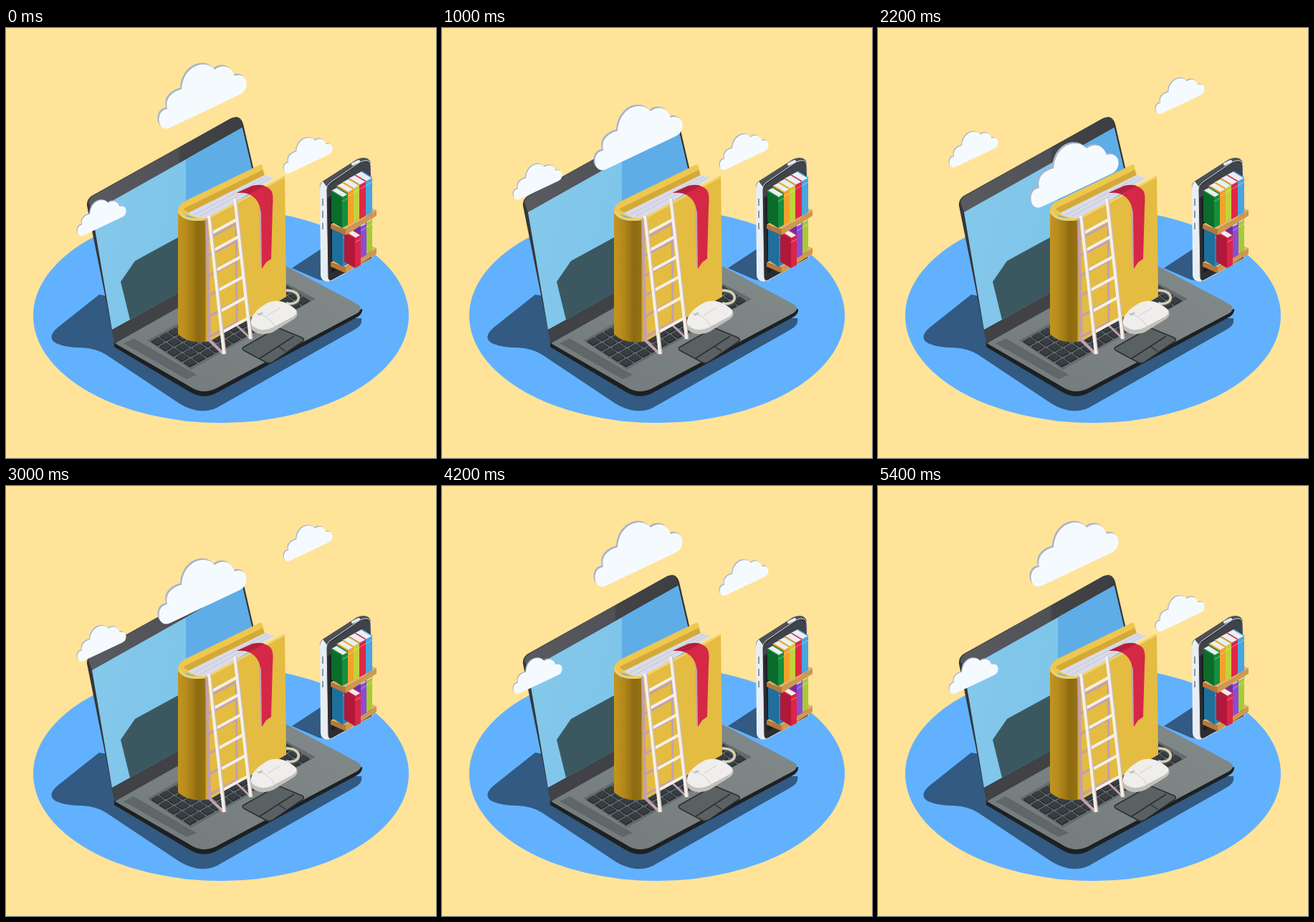
These frames come from a looping animation (600 by 600 pixels, 5.5 s). An HTML page:

```html
<!DOCTYPE html>
<html lang="en">
<head>
<meta charset="utf-8">
<title>Online library</title>
<style>
html, body { margin: 0; width: 100%; height: 100%; overflow: hidden; background: #ffe398; }
svg { display: block; width: 100vw; height: 100vh; }
</style>
</head>
<body>
<svg viewBox="0 0 600 600">
  <defs>
    <linearGradient id="bezel">
      <stop offset="0" stop-color="#5a5b60"/><stop offset=".58" stop-color="#505156"/>
      <stop offset=".6" stop-color="#434448"/><stop offset="1" stop-color="#3d3e42"/>
    </linearGradient>
    <linearGradient id="screen" x1="0" y1="0" x2="1" y2=".3">
      <stop offset="0" stop-color="#86c9ea"/><stop offset="1" stop-color="#7ac3eb"/>
    </linearGradient>
    <linearGradient id="deck" x1="0" y1="1" x2="1" y2="0">
      <stop offset="0" stop-color="#727a7b"/><stop offset="1" stop-color="#838a8a"/>
    </linearGradient>
    <linearGradient id="spine">
      <stop offset="0" stop-color="#c3951f"/><stop offset=".25" stop-color="#b88b1c"/>
      <stop offset=".5" stop-color="#9f7815"/><stop offset=".62" stop-color="#8c6a10"/>
      <stop offset=".86" stop-color="#967213"/><stop offset=".9" stop-color="#d3a936"/>
      <stop offset="1" stop-color="#dcb33c"/>
    </linearGradient>
    <path id="puff" d="M229 139C221 143 213.500 138 213.500 128C213.500 119 218 114 225 113C222 101 228 90 245 85.500C246 66 258 53 272 51C282 50 288 54 291 58C303 49 315 54 319 67C329 63 337 70 335.500 80C334 88 331 90 326 93Z"/>
    <g id="cloud">
      <use href="#puff" x="-2" y="-2" fill="#a9b3c8"/>
      <use href="#puff" fill="#f5faff"/>
    </g>
  </defs>

  <rect width="600" height="600" fill="#ffe398"/>
  <ellipse cx="300" cy="401.500" rx="262" ry="149.500" fill="#62b1ff"/>

  <!-- shadows on the floor -->
  <g fill="#325a82">
    <path d="M130 372L72 418Q56 432 70 440Q84 446 106 446Q126 447 140 456L242 524Q270 541 294 530L486 421Q498 415 496 405L300 400Z"/>
    <path d="M399 335L440 308L450 354L436 351Z"/>
  </g>

  <!-- laptop lid -->
  <path fill="#35373a" d="M113 248Q112 239 120 234L314 126Q327 120 331 134L352 225L345 330L152 442Z"/>
  <path fill="url(#bezel)" d="M115 243Q117 237 122 234L314 126Q324 122 327 128L330 139L120 257Z"/>
  <path fill="url(#screen)" d="M120 257L329.500 139L345 205V312L148 421Z"/>
  <path fill="#5fade6" d="M251 183.500L329.500 139L345 205V300H251Z"/>
  <path fill="#3b5861" d="M160 354L180 325L246 289V367L173 407Z"/>
  <path fill="#404246" d="M148 421L246 367V391L152 441Z"/>

  <!-- laptop base -->
  <path fill="#1d2022" d="M151 439V445L257 508Q276 519 294 509L489 404Q498 399 497 392Z"/>
  <path fill="url(#deck)" d="M152 440L346 331Q370 322 394 334L490 385Q500 391 490 398L293 503Q276 511 261 503Z"/>
  <path fill="#5f6769" d="M164 440L178 433L266 484L252 490Z"/>
  <path fill="#636b6d" d="M197 436L366 343L432 378L258 477Z"/>
  <g id="keys"></g>
  <path fill="#5a6163" stroke="#2b2f31" stroke-width="1.500" d="M332 445L376 420Q380 418 384 420L413 432Q418 435 413 438L372 466Q367 469 362 466L332 450Q328 447 332 445Z"/>
  <path fill="none" stroke="#2b2f31" stroke-width="1.500" d="M354 461L402 430M380 444L390 451"/>

  <!-- big book -->
  <path fill="#edc750" d="M240 258Q239 248 249 242L354 191Q357 190 358 193L361 206L282 270Z"/>
  <path fill="#d4a936" d="M248 252L358 198L361 206L262 258Q250 258 248 252Z"/>
  <path fill="#d9dbe8" d="M254 258L361 205L375 209L284 265Q264 267 254 258Z"/>
  <path fill="none" stroke="#c2c6d8" d="M262 261L365 207M270 263L370 209"/>
  <path fill="url(#spine)" d="M240 257Q248 274 281 267L284 437Q255 442 240 427Z"/>
  <path fill="none" stroke="#f0d06a" stroke-width="3.500" d="M241 256Q250 271 281 266"/>
  <path fill="#e4bc41" d="M279 268L389 207L391 375L283 438Z"/>
  <path fill="none" stroke="#f3d36d" stroke-width="3" d="M279 267L389 207"/>

  <!-- ribbon -->
  <path fill="#c9a3a3" d="M353 245L355 335L361 326L357 248Z"/>
  <path fill="#d42846" d="M322 230L344 220Q369 217 372 232Q373 238 372 250L370 322L363 327L357 336L356 258Q354 241 343 234Q334 229 322 230Z"/>
  <path fill="#b51f3b" d="M322 230L344 220Q354 218 361 220L340 231Q332 229 322 230Z"/>

  <g id="ladder" fill="none"></g>

  <!-- mouse -->
  <path fill="none" stroke="#57564f" stroke-width="5" d="M391 385C412 390 416 367 391 367"/>
  <path fill="none" stroke="#d6cfbd" stroke-width="3.500" d="M391 384C412 389 416 366 391 366"/>
  <path fill="#c3bfbb" d="M342 411Q343 398 365 387L404 392Q410 400 402 406L373 424Q358 431 345 423Q341 419 342 411Z"/>
  <path fill="#f0eeec" d="M342 408Q344 395 366 383Q383 376 401 390Q410 397 400 403L372 418Q358 425 346 417Q341 414 342 408Z"/>
  <path fill="none" stroke="#d0cccb" d="M348 398Q366 400 375 416M365 401L383 390"/>
  <path stroke="#c5c0bd" stroke-width="3" stroke-linecap="round" d="M353 400L357 398"/>

  <!-- phone -->
  <path fill="#4d5157" d="M438 224Q437 217 443 213L490 183Q505 177 509 188L511 322L450 354Z"/>
  <path fill="#e9eef3" d="M438 224Q438 218 442 214L448 222L451 354Q439 354 439 344Z"/>
  <path fill="#2a2d32" stroke="#dfe4e9" d="M447 226Q447 220 452 216L494 187Q508 181 509 192L511 321L455 352Q450 354 449 348Z"/>
  <path fill="#404349" d="M448 226Q448 221 453 218L494 188Q506 184 508 193V204L448 237Z"/>
  <path stroke="#e7ebef" stroke-width="4" stroke-linecap="round" d="M484 190L492 186"/>
  <path stroke="#8c97a2" stroke-width="2" d="M442 238V248M442 255V265M442 272V281"/>
  <path fill="#1d1f23" d="M451 238L508 206L509 313L454 342Z"/>
  <g id="shelves"></g>

  <use id="c0" href="#cloud"/>
  <use id="c1" href="#cloud"/>
  <use id="c2" href="#cloud"/>
</svg>
<script>
const el = id => document.getElementById(id);
const poly = (pts, fill) => `<polygon points="${pts}" fill="${fill}"/>`;
const line = (x1, y1, x2, y2, color, w) =>
  `<path d="M${x1} ${y1}L${x2} ${y2}" stroke="${color}" stroke-width="${w}"/>`;

// Keyboard: 14 by 5 slanted keys
function drawKeys() {
  const at = (a, b) => [200 + a * 12.1 + b * 11.4, 436.5 - a * 6.65 + b * 7.4];
  let out = "";
  for (let b = 0; b < 5; b++) for (let a = 0; a < 14; a++) {
    const q = [at(a + .08, b + .1), at(a + .9, b + .1), at(a + .9, b + .88), at(a + .08, b + .88)];
    out += poly(q.map(([x, y]) => [x, y + 1.3]), "#1f2326") + poly(q, "#373d41");
  }
  el("keys").innerHTML = out;
}

function drawLadder() {
  const wood = "#f5f0e8", shade = "#c3a0b0";
  const left = y => 283 + 21 * (y - 262) / 193;
  const right = y => 319 + 22 * (y - 238) / 196;
  const rungs = [287, 311, 339, 367, 396, 425];
  let out = line(280, 266, 284, 437, shade, 4) + line(283, 435, 303, 454, shade, 4)
    + line(321, 243, 322, 415, shade, 3) + line(321, 414, 340, 432, shade, 3);
  for (const y of rungs) out += line(282, y + 7, 321, y - 14, shade, 3.5);
  for (const y of rungs) out += line(left(y), y, right(y - 20), y - 20, wood, 4);
  out += line(285, 262, 306, 455, "#cdbcb8", 3) + line(283, 262, 304, 455, wood, 4)
    + line(321, 238, 343, 434, "#cdbcb8", 3) + line(319, 238, 341, 434, wood, 4);
  el("ladder").innerHTML = out;
}

// Upright book: x, y is the top of the edge nearest the viewer
function book([x, y, w, h, light, dark]) {
  const d = 15, k = 9, r = w * .53;
  return poly([[x - d, y - k], [x, y], [x, y + h], [x - d, y + h - k]], dark)
    + poly([[x, y], [x + w, y - r], [x + w, y - r + h], [x, y + h]], light)
    + poly([[x - d, y - k], [x - d + w, y - k - r], [x + w, y - r], [x, y]], "#eceef3")
    + line(x, y, x - d, y - k, light, 1.5) + line(x + w, y - r, x + w - d, y - r - k, light, 1.5)
    + line(x, y + 6, x + w, y + 6 - r, "#ffffff66", 1);
}

function shelf(y) {
  return poly([[453, y], [500, y - 26], [517, y - 20], [474, y + 7]], "#e3b36c")
    + poly([[453, y], [474, y + 7], [474, y + 15], [453, y + 6]], "#b5783a")
    + poly([[474, y + 7], [517, y - 20], [517, y - 12], [474, y + 15]], "#cf9850");
}

function drawShelves() {
  const lower = [
    [503, 272, 8, 43, "#a6cb33", "#7a9a1e"], [495, 277, 8, 44, "#8a4cd6", "#6531a8"],
    [470, 287, 7, 46, "#2a86b8", "#1f6f9c"], [487, 293, 8, 42, "#dc2545", "#b0183a"]
  ];
  const upper = [
    [502, 214, 9, 48, "#4aa5e0", "#2a78b4"], [493, 219, 9, 48, "#df2846", "#ad1a36"],
    [485, 224, 8, 47, "#c4d13a", "#93a122"], [477, 229, 8, 46, "#f0a32c", "#c47d18"],
    [469, 236, 8, 43, "#158f3d", "#0b6b2b"]
  ];
  el("shelves").innerHTML = shelf(327) + lower.map(book).join("")
    + shelf(274) + upper.map(book).join("");
}

const ease = p => { p = Math.min(1, Math.max(0, p)); return p * p * (3 - 2 * p); };
const trip = (t, a, b, c, d) => ease((t - a) / (b - a)) - ease((t - c) / (d - c));

function place(id, x, y, s) {
  el(id).setAttribute("transform", `translate(${x} ${y.toFixed(2)}) scale(${s})`);
}

function render(ms) {
  const t = Math.floor(ms / 100) * 100 % 5500;
  const near = trip(t, 180, 1780, 2070, 3850);
  const far = trip(t, 735, 2680, 3235, 5190);
  place("c0", 0, 112 * near, 1);
  place("c1", -19, 212 - 97 * near, .556);
  place("c2", 269, 125 - 98 * far, .556);
}

drawKeys();
drawLadder();
drawShelves();
const start = performance.now();
function tick() {
  render(performance.now() - start);
  requestAnimationFrame(tick);
}
render(0);
tick();
</script>
</body>
</html>
```
